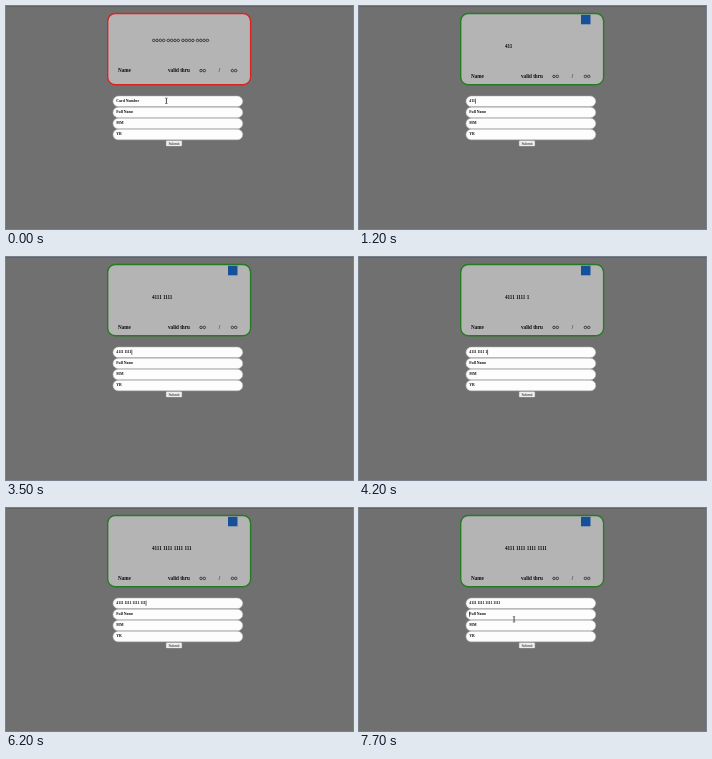
These frames come from a looping animation (347x223 px, 8 s). An HTML page with a canvas:

```html
<!DOCTYPE html>
<html lang="en">
<head>
<meta charset="utf-8">
<title>Card form</title>
<style>
html, body { margin: 0; width: 100%; height: 100%; overflow: hidden; background: #707070; }
canvas { display: block; width: 347px; height: 223px; }
</style>
</head>
<body>
<canvas id="stage"></canvas>
<script>
const W = 347, H = 223, LOOP = 8000;
const SERIF = '"Liberation Serif", "Times New Roman", serif';
const CARD_FONT = `bold 5.15px ${SERIF}`;
const FIELD_FONT = `bold 3.8px ${SERIF}`;
const INK = '#0c0c0c';

// A digit typed past a full group shows unspaced until the field reformats.
const typed = [
  [200, '4'], [700, '41'], [900, '411'], [1600, '4111'],
  [2600, '41111'], [2700, '4111 1'], [2800, '4111 11'],
  [3000, '4111 111'], [3500, '4111 1111'],
  [4000, '4111 11111'], [4100, '4111 1111 1'],
  [4400, '4111 1111 11'], [4600, '4111 1111 111'], [5100, '4111 1111 1111'],
  [5600, '4111 1111 11111'], [5700, '4111 1111 1111 1'],
  [5900, '4111 1111 1111 11'], [6200, '4111 1111 1111 111'],
  [6700, '4111 1111 1111 1111']
];

const canvas = document.getElementById('stage');
const ctx = canvas.getContext('2d');
const dpr = window.devicePixelRatio || 1;
canvas.width = Math.round(W * dpr);
canvas.height = Math.round(H * dpr);

function rect(x, y, w, h, color) {
  ctx.fillStyle = color;
  ctx.fillRect(x, y, w, h);
}

function roundBox(x, y, w, h, r, fill, stroke, line) {
  ctx.beginPath();
  ctx.roundRect(x, y, w, h, r);
  ctx.fillStyle = fill;
  ctx.fill();
  ctx.strokeStyle = stroke;
  ctx.lineWidth = line;
  ctx.stroke();
}

function text(str, x, y, font) {
  ctx.font = font;
  ctx.fillStyle = INK;
  ctx.fillText(str, x, y);
}

function rings(count, x, y) {
  ctx.strokeStyle = INK;
  ctx.lineWidth = 0.65;
  for (let i = 0; i < count; i++) {
    ctx.beginPath();
    ctx.arc(x + 1.7 + i * 3.33, y, 1.25, 0, Math.PI * 2);
    ctx.stroke();
  }
}

function mix(a, b, k) {
  return `rgb(${a.map((v, i) => Math.round(v + (b[i] - v) * k)).join(',')})`;
}

function caret(x, y) {
  rect(x, y - 2.6, 0.6, 5.2, '#111');
}

function pointer(x, y) {
  rect(x - 0.35, y - 2.4, 0.8, 5, '#222');
  rect(x - 1.2, y - 2.8, 2.4, 0.6, '#333');
  rect(x - 1.2, y + 2.4, 2.4, 0.6, '#333');
}

function drawCard(t, number) {
  const drop = t >= 900 ? 5.8 : 0;
  const k = Math.min(1, Math.max(0, (Math.floor(t / 100) - 1) / 3));
  const border = mix([218, 36, 32], [38, 122, 34], k);
  roundBox(101.7, 7.5, 142.9, 71.2, 7.5, '#b4b4b4', border, 1.4);

  if (drop) rect(222, 8.8, 9.5, 9.5, '#17509a');

  if (number) {
    text(number, 146, 36.2 + drop, CARD_FONT);
  } else {
    for (let g = 0; g < 4; g++) rings(4, 146 + g * 14.6, 34.4);
  }

  const base = 66.2 + drop;
  text('Name', 112, base, CARD_FONT);
  text('valid thru', 162, base, CARD_FONT);
  rings(2, 193.3, 64.6 + drop);
  text('/', 212.7, base, CARD_FONT);
  rings(2, 224.7, 64.6 + drop);
}

function drawForm(t, number, lastKey) {
  const labels = [number || 'Card Number', 'Full Name', 'MM', 'YR'];
  labels.forEach((label, i) => {
    const y = 90.1 + i * 11.05;
    roundBox(107, y, 129.7, 10.5, 5.25, '#fdfdfd', '#b9b9b9', 0.5);
    text(label, 110.3, y + 6.2, FIELD_FONT);
  });

  if (number && t - lastKey < 500) {
    ctx.font = FIELD_FONT;
    caret(110.5 + ctx.measureText(number).width, 95.2);
  }
  if (t >= 7700) caret(110.1, 106.2);

  roundBox(160.2, 134.8, 15.6, 5.3, 0.6, '#f1f1f1', '#d0d0d0', 0.3);
  ctx.textAlign = 'center';
  text('Submit', 168, 138.8, `3.9px ${SERIF}`);
  ctx.textAlign = 'left';
}

function drawPointer(t) {
  if (t < 200) {
    pointer(160.3, 94.6);
  } else if (t >= 7300) {
    const k = Math.min(1, Math.floor((t - 7300) / 100) / 4);
    const ease = k * (2 - k);
    pointer(159.5 - 4.5 * ease, 95.5 + 15.8 * ease);
  }
}

function draw(t) {
  let number = '', lastKey = 0;
  for (const [at, value] of typed) {
    if (t < at) break;
    number = value;
    lastKey = at;
  }
  ctx.setTransform(canvas.width / W, 0, 0, canvas.height / H, 0, 0);
  rect(0, 0, W, H, '#707070');
  rect(0, 0, W, 0.7, '#5c5c5c');
  drawCard(t, number);
  drawForm(t, number, lastKey);
  drawPointer(t);
}

const start = performance.now();
function tick() {
  draw((performance.now() - start) % LOOP);
  requestAnimationFrame(tick);
}
tick();
</script>
</body>
</html>
```
